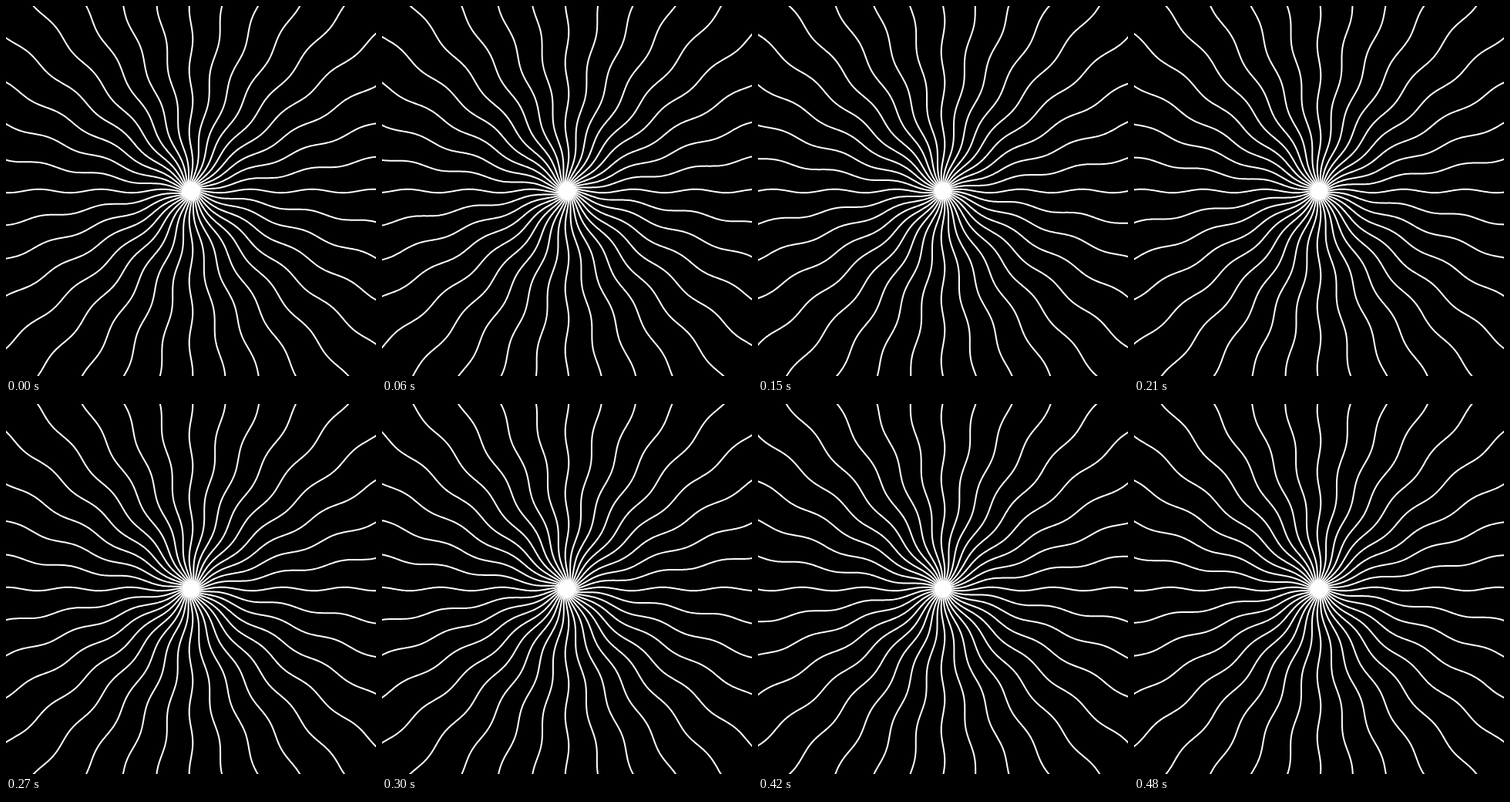
These frames come from a looping animation (480x480 px, 0.51 s). An HTML page with a canvas:

```html
<!DOCTYPE html>
<html lang="en">
<head>
<meta charset="utf-8">
<title>Wavy rays</title>
<style>
  html, body { margin: 0; width: 100%; height: 100%; overflow: hidden; background: #000; }
  canvas { display: block; width: 480px; height: 480px; }
</style>
</head>
<body>
<canvas id="stage" width="480" height="480"></canvas>
<script>
  const ctx = document.getElementById('stage').getContext('2d');
  const SIZE = 480, MID = SIZE / 2, TAU = Math.PI * 2;
  const RAYS = 36, REACH = 350, AMP = 2.3, WAVE = 80, CREST = 237;
  const STEPS = 17, STEP_MS = 30;

  // Sideways offset of every ray at radius r; the wave runs outwards.
  const sway = (r, phase) => AMP * Math.cos(TAU * ((r - CREST) / WAVE - phase));

  function drawRay(angle, phase) {
    const c = Math.cos(angle), s = Math.sin(angle);
    ctx.beginPath();
    for (let r = 0; r <= REACH; r += 2) {
      const d = sway(r, phase);
      ctx.lineTo(MID + r * c + d * s, MID + r * s - d * c);
    }
    ctx.stroke();
  }

  function draw(phase) {
    ctx.fillStyle = '#000';
    ctx.fillRect(0, 0, SIZE, SIZE);
    ctx.strokeStyle = ctx.fillStyle = '#fff';
    ctx.lineWidth = 2;
    ctx.lineJoin = 'round';
    for (let i = 0; i < RAYS; i++) drawRay(i / RAYS * TAU, phase);
    ctx.beginPath();
    ctx.arc(MID, MID, 11, 0, TAU);
    ctx.fill();
  }

  const start = performance.now();
  function tick() {
    const step = Math.floor((performance.now() - start) / STEP_MS) % STEPS;
    draw(step / STEPS);
    requestAnimationFrame(tick);
  }
  tick();
</script>
</body>
</html>
```
